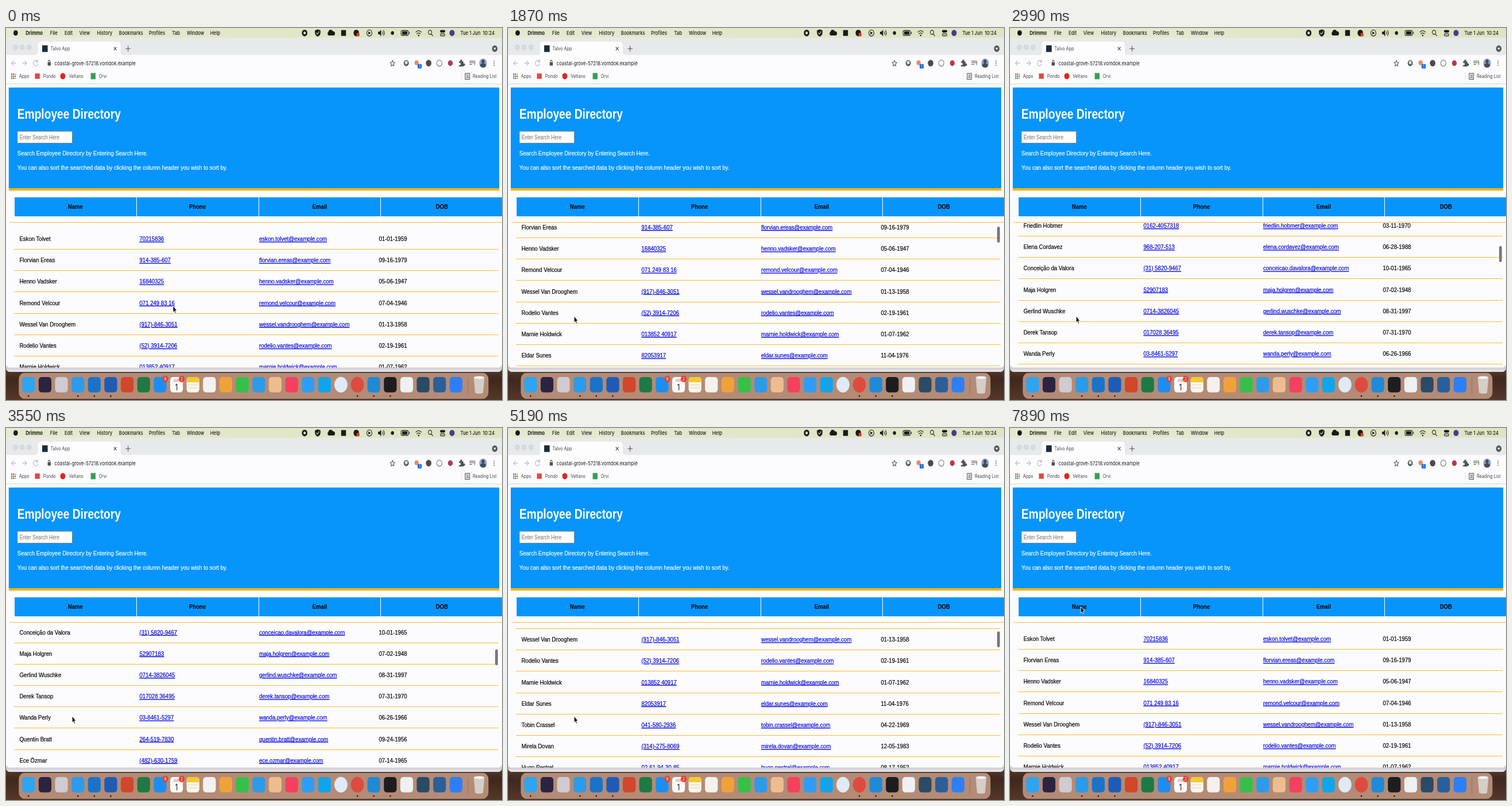
Write an HTML page that moves like this. It is 864 px wide and 648 px high and loops after 7990 ms.

```html
<!DOCTYPE html>
<html lang="en">
<head>
<meta charset="utf-8">
<title>Employee Directory</title>
<style>
  html, body { margin: 0; width: 100%; height: 100%; overflow: hidden; background: #fcfcfe; }
  #screen { display: block; width: 864px; height: 648px; }
  text { white-space: pre; }
  rect.crisp, .crisp rect { shape-rendering: crispEdges; }
  .ui { font-family: Inter, Roboto, sans-serif; font-size: 13px; fill: #1c1d1a; }
  .small { font-size: 12px; fill: #45484c; }
  #menu { font-weight: 500; }
  .page { font-family: "Liberation Sans", Arial, sans-serif; font-size: 16px; }
  .ink text { stroke: #000; stroke-width: .3; }
  .ink .link { fill: #0000e4; stroke: #0000e4; text-decoration: underline; }
  .pale { fill: #fff; stroke: #fff; stroke-width: .3; }
  .mid { text-anchor: middle; }
  .line { fill: none; stroke-width: 1.7; stroke-linecap: round; stroke-linejoin: round; }
</style>
</head>
<body>
<!-- A 1440 x 900 desktop shown on a 4:3 stage -->
<svg id="screen" viewBox="0 0 1440 900" preserveAspectRatio="none">
  <defs>
    <linearGradient id="bar"><stop stop-color="#e6e9d0"/><stop offset="1" stop-color="#dfe3c4"/></linearGradient>
    <linearGradient id="wood" x2="0" y2="1"><stop stop-color="#6e4a36"/><stop offset=".5" stop-color="#3f281d"/><stop offset="1" stop-color="#54382a"/></linearGradient>
    <linearGradient id="shade" gradientUnits="userSpaceOnUse" x1="0" x2="0" y1="821" y2="832"><stop stop-color="#cbcad1"/><stop offset="1" stop-color="#e9e8ed"/></linearGradient>
    <clipPath id="view"><rect x="8" y="471" width="1432" height="350.5"/></clipPath>
  </defs>

  <!-- Desktop and windows -->
  <rect y="800" width="1440" height="100" fill="url(#wood)"/>
  <rect y="780" width="1440" height="52" rx="10" fill="url(#shade)"/>
  <rect y="24" width="1440" height="797.5" rx="9" fill="#fcfcfe"/>

  <!-- Menu bar -->
  <rect width="1440" height="24.5" fill="url(#bar)"/>
  <g class="ui" id="menu">
    <circle cx="28" cy="12" r="6.5" fill="#111"/>
    <text x="57" y="16.7" font-weight="700">Drimmo</text>
    <text x="1319" y="16.7">Tue 1 Jun  10:24</text>
  </g>
  <g fill="#191a18">
    <circle cx="867" cy="12" r="8"/><rect x="864" y="9" width="6" height="6" fill="#e2e4d0"/>
    <path d="M897 6l8-3 8 3v6q-1 6-8 9-7-3-8-9z"/>
    <path class="line" d="M901 12l3 3 5-6" stroke="#e2e4d0"/>
    <path d="M937 18a5 5 0 0 1-1-9 7 7 0 0 1 13-1 5 5 0 0 1 2 10z"/>
    <rect x="973" y="5" width="14" height="14"/>
    <circle cx="1017" cy="12" r="8"/><circle cx="1022" cy="16" r="4.5" fill="#e03a2f"/>
    <path d="M1052 8l7 4-7 4zM1080 9h4l5-5v16l-5-5h-4z"/>
    <circle cx="1122" cy="12" r="4.5"/>
    <rect x="1150" y="8" width="15" height="8" rx="1.5"/>
    <circle cx="1198" cy="18" r="2"/>
    <rect x="1260" y="5" width="15" height="6" rx="3"/>
    <circle cx="1295" cy="12" r="7.5" fill="#4b3a8c"/>
    <g class="line" stroke="#191a18">
      <circle cx="1055" cy="12" r="7.5"/>
      <path d="M1093 9q2 3 0 6M1096 6q5 6 0 12"/>
      <rect x="1147" y="6" width="21" height="12" rx="3"/><path d="M1171 10v4"/>
      <path d="M1190 10q8-7 16 0M1193 14q5-4 10 0"/>
      <circle cx="1231" cy="10.5" r="5"/><path d="M1235 15l4 4"/>
      <rect x="1261" y="14" width="13" height="5" rx="2.5"/>
    </g>
  </g>

  <!-- Tabs -->
  <rect y="24.5" width="1440" height="41" fill="#e7e9ea"/>
  <g fill="#dadbdc" stroke="#c7c8c9"><circle cx="27" cy="47" r="6"/><circle cx="47" cy="47" r="6"/><circle cx="67" cy="47" r="6"/></g>
  <path d="M85 66q8 0 8-8V41q0-8 8-8h224q8 0 8 8v17q0 8 8 8z" fill="#fdfdfe"/>
  <rect x="105" y="42" width="16" height="16" fill="#1d2a33"/>
  <text class="ui small" x="129" y="54">Talvo App</text>
  <path class="line" d="M313.5 46.500l7 7m0-7l-7 7M348 50h13m-6.500-6.500v13" stroke="#4d5054"/>
  <circle cx="1419" cy="50" r="8" fill="#55585c"/><path d="M1415 48h8l-4 5z" fill="#fff"/>

  <!-- Address row -->
  <g class="line" stroke="#b4b7ba">
    <path d="M28 85H16m5-5l-5 5 5 5M48 85h12m-5-5l5 5-5 5"/>
    <path d="M91 81a6.500 6.500 0 1 0 1 6M92 77v5h-5"/>
  </g>
  <rect x="121" y="83" width="9" height="8" rx="1" fill="#4d5054"/>
  <path class="line" d="M123 83v-2.500a2.500 2.500 0 0 1 5 0V83" stroke="#4d5054"/>
  <text class="ui" x="141" y="90">coastal-grove-57218.vomdok.example</text>
  <path class="line" d="M1122 78l2 5 5 .5-4 3.500 1.300 5-4.300-2.700-4.300 2.700 1.300-5-4-3.500 5-.5z" stroke="#55585c"/>
  <circle cx="1162" cy="85" r="7.5" fill="#59616e"/><circle cx="1162" cy="83.5" r="4" fill="#dfe4ee"/>
  <circle cx="1192" cy="84" r="6" fill="#ef8a63"/><rect x="1195" y="87" width="12" height="11" rx="2" fill="#1a6fe0"/>
  <text x="1201" y="95.5" class="ui mid" style="font-size:9px;fill:#fff">1</text>
  <circle cx="1227" cy="85" r="8" fill="#4a4b4d"/>
  <circle class="line" cx="1258" cy="85" r="7.5" stroke="#75777a"/>
  <circle cx="1290" cy="85" r="7" fill="#b33c4c"/>
  <path d="M1315 81h4a3 3 0 1 1 5 0h4v5a3 3 0 1 1 0 5v2h-13v-4a3 3 0 1 0 0-4z" fill="#4d5054"/>
  <path class="line" d="M1346 80h13m-13 4h13m-13 4h7M1361 80v9" stroke="#65686c"/>
  <circle cx="1385" cy="85" r="11" fill="#8fa6c4"/>
  <path d="M1376 91q2-6 9-6t9 6q-3 5-9 5t-9-5z" fill="#464a58"/><circle cx="1385" cy="81" r="4.5" fill="#464a58"/>
  <g fill="#65686c"><circle cx="1417" cy="80" r="1.5"/><circle cx="1417" cy="85" r="1.5"/><circle cx="1417" cy="90" r="1.5"/></g>

  <!-- Bookmarks -->
  <g id="apps"></g>
  <rect x="84" y="110" width="14" height="13" fill="#df4a3c"/>
  <circle cx="165" cy="116.5" r="7.5" fill="#e0241b"/>
  <rect x="246" y="109" width="14" height="15" fill="#35a056"/>
  <g class="ui small">
    <text x="38" y="121">Apps</text><text x="108" y="121">Pondo</text>
    <text x="182" y="121">Veltano</text><text x="269" y="121">Orvi</text>
    <text x="1355" y="121">Reading List</text>
  </g>
  <path d="M1322 108v17" stroke="#cfd0d3"/>
  <path class="line" d="M1333 110h13v14h-13zM1336 114h1m2 0h4m-7 3h1m2 0h4m-7 3h1m2 0h4" stroke="#55585c" stroke-width="1.3"/>
  <rect class="crisp" y="134.7" width="1440" height="1.4" fill="#d3d4d8"/>

  <!-- Page -->
  <rect x="8" y="144" width="1424" height="244" fill="#0795fb"/>
  <rect x="8" y="387.5" width="1424" height="6" fill="#fcb10c"/>
  <g class="page">
    <text x="33" y="220" style="font-size:32px" font-weight="700" fill="#fff">Employee Directory</text>
    <rect class="crisp" x="33.3" y="250" width="159" height="28.5" fill="#fff" stroke="#85878b" stroke-width="1.4"/>
    <text x="39.5" y="269" style="font-size:14px" fill="#707070">Enter Search Here</text>
    <text class="pale" x="33" y="309">Search Employee Directory by Entering Search Here.</text>
    <text class="pale" x="33" y="343">You can also sort the searched data by clicking the column header you wish to sort by.</text>
  </g>
  <g id="heads" class="page mid crisp" font-weight="700"></g>
  <g clip-path="url(#view)"><g id="rows" class="page ink crisp"></g></g>
  <rect class="crisp" x="10" y="469.5" width="1430" height="1.4" fill="#fcbb30"/>
  <rect id="thumb" x="1420" y="473.5" width="8" height="38.5" rx="4" fill="#78777b"/>

  <!-- Dock -->
  <rect x="38" y="835" width="1362" height="61.5" rx="15" fill="#b48b76" stroke="#c9a692"/>
  <g id="dock" class="ui mid"></g>

  <path id="arrow" d="M0 0v16l3.600-3.400 2.500 5.700 2.700-1.100-2.500-5.500H11z" fill="#000" stroke="#fff" stroke-width="1.2"/>
</svg>
<script>
const LOOP = 7990, PITCH = 51.67;
const el = id => document.getElementById(id);
const add = (id, markup) => el(id).insertAdjacentHTML('beforeend', markup);
const label = (x, y, s, extra = '') => `<text x="${x}" y="${y}" ${extra}>${s}</text>`;
const box = (x, y, w, h, fill, r = 0) => `<rect x="${x}" y="${y}" width="${w}" height="${h}" rx="${r}" fill="${fill}"/>`;
const disc = (x, y, r, fill) => `<circle cx="${x}" cy="${y}" r="${r}" fill="${fill}"/>`;

const menus = { File: 128, Edit: 170, View: 213, History: 264, Bookmarks: 328, Profiles: 415, Tab: 482, Window: 525, Help: 593 };
for (const name in menus) add('menu', label(menus[name], 16.7, name));

const tints = ['#e0453a', '#e0453a', '#e8b12c', '#3b7de0', '#e0453a', '#35a056', '#3b7de0', '#35a056', '#e8b12c'];
tints.forEach((c, i) => add('apps', box(15 + i % 3 * 5, 110 + (i / 3 | 0) * 5, 3.5, 3.5, c)));

['Name', 'Phone', 'Email', 'DOB'].forEach((name, i) => {
  const x = 25 + i * 354.7;
  add('heads', box(x, 409.5, 352.8, 45.5, '#0795fb') + label(x + 176.4, 438.2, name));
});

const people = `Eskon Tolvet|70215836|01-01-1959
Florvian Ereas|914-385-607|09-16-1979
Henno Vadsker|16840325|05-06-1947
Remond Velcour|071 249 83 16|07-04-1946
Wessel Van Drooghem|(917)-846-3051|01-13-1958
Rodelio Vantes|(52) 3914-7206|02-19-1961
Marnie Holdwick|013852 40917|01-07-1962
Eldar Sunes|82053917|11-04-1976
Tobin Crassel|041-580-2936|04-22-1969
Mirela Dovan|(314)-275-8069|12-05-1983
Hugo Pestrel|02-61-94-30-85|08-17-1952
Friedlin Hobmer|0162-4057318|03-11-1970
Elena Cordavez|968-207-513|06-28-1988
Conceição da Valora|(31) 5820-9467|10-01-1965
Maja Holgren|52907183|07-02-1948
Gerlind Wuschke|0714-3826045|08-31-1997
Derek Tansop|017028 36495|07-31-1970
Wanda Perly|03-8461-5297|06-26-1966
Quentin Bratt|264-519-7830|09-24-1956
Ece Özmar|(482)-630-1759|07-14-1965
Shawna Colbrin|04-6193-2508|06-28-1975
Ivo Karsten Mell|59028143|02-08-1981`.split('\n');

function mail(name) {
  const [first, ...rest] = name.toLowerCase().normalize('NFD').replace(/[\u0300-\u036f]/g, '').split(' ');
  return `${first}.${rest.join('')}@example.com`;
}
people.forEach((person, i) => {
  const [name, phone, born] = person.split('|');
  const y = 515.3 + i * PITCH;
  add('rows', label(39, y, name) + label(387.5, y, phone, 'class="link"') +
    label(735, y, mail(name), 'class="link"') + label(1082.5, y, born) +
    box(23, y + 19.5, 1407, 1.4, '#fcbb30'));
});

// "o" marks a round icon
const icons = `#2fa4f0 #2b2440 #cfcbd0 #2b9bea #1a73c8 #1f5bb5 #d0472a #1d7a44 #1d8ef0 #fafafa #fbf7ea
  #f4f1ee #f0a23a #35c04a #2f9ae8 #eebd8f #f5405e #2f9df5 #10a5ea o#dfeaf6 o#dd4b3e #1f8ad6 #1d1d1f
  #eef0f1 #2a4a66 #2b5f9a #2d7ff9`.split(/\s+/);
const running = [0, 3, 4, 5, 20, 21, 22];
icons.forEach((icon, i) => {
  const x = 65.5 + i * 47.73, round = icon[0] === 'o';
  add('dock', round ? disc(x, 863, 19, icon.slice(1)) : box(x - 18.5, 844.5, 37, 37, icon, 8));
  if (running.includes(i)) add('dock', disc(x, 890.5, 2, '#1d1512'));
  if (i === 9) add('dock', label(x, 856, 'JUN', 'style="font-size:9px;fill:#e23b32"') + label(x, 876, '1', 'style="font-size:20px"'));
  if (i === 10) add('dock', `<path d="M${x - 18.5} 857v-4.500q0-8 8-8h21q8 0 8 8v4.500z" fill="#f8c930"/>` +
    box(x - 13, 863, 26, 1.2, '#cfcac0') + box(x - 13, 870, 26, 1.2, '#cfcac0'));
  if (i === 8 || i === 9) add('dock', disc(x + 15, 849, 8, '#ee3b30') + label(x + 15, 853, i === 8 ? 9 : 2, 'style="font-size:11px;fill:#fff"'));
});
add('dock', box(1340, 845, 1.5, 40, '#97705e') +
  '<path d="M1358 846h31l-4 37q-11 4-23 0z" fill="#d9d9d8" fill-opacity=".85"/>' +
  '<ellipse cx="1373.5" cy="846" rx="15.5" ry="4" fill="#f3f3f2" stroke="#b9b6b3"/>');

// Keys are [step, value, slope], joined by cubic curves
const scroll = [[34, 0], [41, 79.6, 18], [65, 600.3, 17], [77, 687.6, 3.5], [96, 727.2, .7], [98, 728], [118, 0]];
const curX = [[15, 485], [31, 192], [136, 192], [160, 205.5]];
const curY = [[15, 672], [31, 697], [136, 697], [160, 432]];
const bar = [[33, 0], [35, 1], [134, 1], [140, 0]];

function at(keys, n) {
  const i = keys.findIndex(k => k[0] > n);
  if (i === 0) return keys[0][1];
  if (i < 0) return keys[keys.length - 1][1];
  const [n0, a, sa = 0] = keys[i - 1], [n1, b, sb = 0] = keys[i];
  const d = n1 - n0, u = (n - n0) / d, v = 1 - u;
  return v * v * (1 + 2 * u) * a + u * u * (3 - 2 * u) * b + u * v * d * (v * sa - u * sb);
}

// Playback ticks: 20, 20 and 100 ms, repeating
function stepAt(t) {
  const k = Math.floor((t - 10) / 140), rest = t - 10 - k * 140;
  return 3 * k + (rest < 20 ? 0 : rest < 40 ? 1 : 2);
}

function draw(t) {
  const n = stepAt(t), s = at(scroll, n);
  el('rows').setAttribute('transform', `translate(0 ${-s})`);
  el('thumb').setAttribute('transform', `translate(0 ${s * .09})`);
  el('thumb').setAttribute('opacity', at(bar, n));
  el('arrow').setAttribute('transform', `translate(${at(curX, n)} ${at(curY, n)})`);
}

const start = performance.now();
function tick() {
  draw((performance.now() - start) % LOOP);
  requestAnimationFrame(tick);
}
tick();
</script>
</body>
</html>
```
